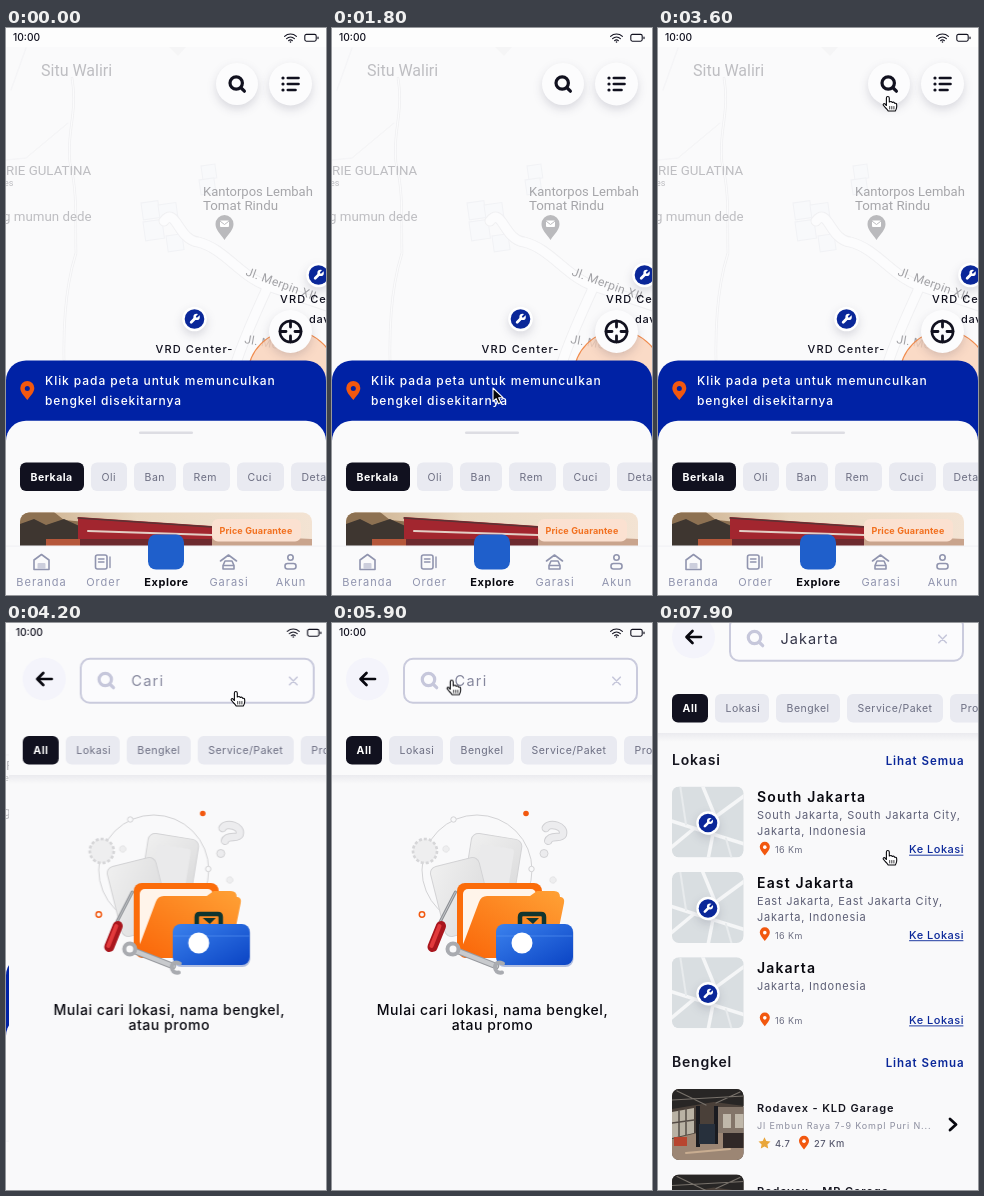
Write an HTML page that moves like this. It is 320 by 567 pixels and loops after 8 s.

```html
<!DOCTYPE html>
<html lang="id">
<head>
<meta charset="utf-8">
<title>Cari bengkel</title>
<style>
html, body { margin: 0; width: 100%; height: 100%; overflow: hidden; background: #f9f9fa; }
svg { display: block; width: 100vw; height: 100vh; }
text { font-family: Inter, sans-serif; white-space: pre; }
.map text { font-family: Roboto, sans-serif; }
.lift { filter: drop-shadow(0 4px 5px rgba(30, 30, 60, .15)); }
.slide { animation: slide 8s infinite; }
.results { animation: results 8s step-end infinite; }
.cursor { animation: move 8s ease-in-out infinite; }
.arrow { animation: arrow 8s step-end infinite; }
.hand { animation: hand 8s step-end infinite; }
@keyframes slide {
  0%, 47.86% { transform: translateX(321px); animation-timing-function: ease-out; }
  52.86%, 100% { transform: translateX(0); }
}
@keyframes results {
  0% { visibility: hidden; }
  80% { visibility: visible; }
}
@keyframes move {
  0%, 12.5% { transform: translate(150px, 590px); }
  21.25%, 23.75% { transform: translate(161px, 360px); }
  36.25%, 55% { transform: translate(230px, 68px); }
  60.6%, 66% { transform: translate(283px, 201px); }
  74.4%, 85% { transform: translate(118px, 55px); }
  93.75%, 100% { transform: translate(230px, 227px); }
}
@keyframes arrow {
  0%, 55.6%, 80% { opacity: 1; }
  35%, 73.5%, 93% { opacity: 0; }
}
@keyframes hand {
  0%, 55.6%, 80% { opacity: 0; }
  35%, 73.5%, 93% { opacity: 1; }
}
</style>
</head>
<body>
<svg id="stage" viewBox="0 0 320 567" preserveAspectRatio="none">
  <defs>
    <linearGradient id="orange" x1="0" y1="1" x2="1" y2="0">
      <stop stop-color="#fa6508"/><stop offset="1" stop-color="#ffa236"/>
    </linearGradient>
    <linearGradient id="blue" x2="1" y2="1">
      <stop stop-color="#3b82ee"/><stop offset="1" stop-color="#0b44c4"/>
    </linearGradient>
    <linearGradient id="paper" x2="1" y2="1">
      <stop stop-color="#f0f0f0"/><stop offset="1" stop-color="#d9d9da"/>
    </linearGradient>
    <linearGradient id="sky">
      <stop stop-color="#c9ab88"/><stop offset=".4" stop-color="#e9d9c2"/><stop offset="1" stop-color="#f3e3d3"/>
    </linearGradient>
    <linearGradient id="shade" x2="0" y2="1">
      <stop stop-color="#30305a" stop-opacity=".07"/><stop offset="1" stop-color="#30305a" stop-opacity="0"/>
    </linearGradient>
    <clipPath id="banner"><rect x="14" y="484.5" width="292" height="60" rx="9"/></clipPath>
    <clipPath id="thumb"><rect width="71.5" height="71" rx="7"/></clipPath>
  </defs>
</svg>
<script>
const INK = '#11111f', GREY = '#6c6e82', NAVY = '#0a2799', PANEL = '#0022a5', CORAL = '#f2580f', FAINT = '#c6c7db';

const rect = (x, y, w, h, r, fill, extra = '') =>
  `<rect x="${x}" y="${y}" width="${w}" height="${h}" rx="${r}" fill="${fill}" ${extra}/>`;
const circle = (x, y, r, fill, extra = '') =>
  `<circle cx="${x}" cy="${y}" r="${r}" fill="${fill}" ${extra}/>`;
const fill = (d, color, extra = '') => `<path d="${d}" fill="${color}" ${extra}/>`;
const line = (d, color, width = 1, extra = '') =>
  `<path d="${d}" fill="none" stroke="${color}" stroke-width="${width}" stroke-linecap="round" stroke-linejoin="round" ${extra}/>`;
const text = (x, y, s, size, color, weight = 400, gap = 0, extra = '') =>
  `<text x="${x}" y="${y}" font-size="${size}" fill="${color}" font-weight="${weight}" letter-spacing="${gap}" ${extra}>${s}</text>`;
const at = (x, y, inner, extra = '') => `<g transform="translate(${x} ${y}) ${extra}">${inner}</g>`;
const centered = 'text-anchor="middle"', ended = 'text-anchor="end"';

const status = () =>
  text(7, 13.3, '10:00', 10.2, INK, 500) +
  line('M278.6 8.3a8.8 8.8 0 0 1 11.8 0M280.6 10.6a5.8 5.8 0 0 1 7.8 0M282.6 12.7a2.8 2.8 0 0 1 3.8 0', INK, 1.1) +
  circle(284.5, 14, .8, INK) +
  rect(298.8, 6.4, 11.4, 6.8, 1.6, 'none', `stroke="${INK}" stroke-width="1.1"`) +
  rect(311.4, 8.4, 1.2, 2.8, .6, INK);

// Each chip: [left, right, label]; the first one is selected
const chips = (y, list) => list.map(([a, b, label], i) =>
  rect(a, y, b - a, 28.5, 6, i ? '#e9eaf1' : INK) +
  text(a + 10.6, y + 18, label, 10.5, i ? GREY : '#fff', i ? 400 : 700, .45)).join('');

const wrench = line('M-3.3 3.3L1.4-1.4', '#fff', 2.8) + circle(2.1, -2.1, 3.2, '#fff') +
  line('M2.4-2.4L5.2-5.2', NAVY, 2);
const spot = (x, y, k = 1) => at(x, y,
  circle(0, 0, 12.3, '#fff', 'class="lift"') + circle(0, 0, 9.8, NAVY) + wrench, `scale(${k})`);
const drop = (x, y, k = 1, hole = '#fff') => at(x, y,
  fill('M0 9C-4 4-7 1-7-3a7 7 0 0 1 14 0C7 1 4 4 0 9z', CORAL) + circle(0, -2.6, 2.5, hole), `scale(${k})`);
const lens = (x, y, color) =>
  at(x, y, circle(0, 0, 6.2, 'none', `stroke="${color}" stroke-width="3.2"`) + line('M5 5L8.2 8.2', color, 3.2));

function mapLayer() {
  const plots = [[135, 175, 17], [152, 177, 18], [137, 194, 19], [160, 208, 16], [195, 138, 14], [193, 152, 15]];
  const river = 'M66 50C72 85 60 105 64 135C72 165 69 195 70 225C62 250 57 280 58 332';
  const road = 'M158 193C170 178 172 212 192 214C218 220 236 250 262 258L330 281M262 258C250 285 240 305 230 335';
  const place = '#a6a6aa', faded = '#bebec2', street = '#a2a2a6';
  return '<g class="map">' + rect(0, 0, 320, 400, 0, '#fafafb') + rect(0, 0, 320, 19, 0, '#fdfdfd') +
    fill('M163 19h17l-8 9z', '#f5f5f6') +
    plots.map(([x, y, s]) => rect(x, y, s, s, 0, '#f8f9fb', `stroke="#f1f2f5" transform="rotate(-8 ${x} ${y})"`)).join('') +
    line(river, '#eeeef0', 2.6) + line(river, '#fbfbfc', 1.2) +
    line('M20 20L5 62M62 95L20 130L0 132', '#f5f5f7', 1.5) +
    line(road, '#f0f0f2', 11) + line(road, '#fcfcfd', 9) +
    text(35, 47.5, 'Situ Waliri', 16, faded) + text(0, 147, 'RIE GULATINA', 13.3, faded) + text(-2, 158, 'es', 9, faded) +
    text(-3, 193, 'g mumun dede', 13.3, faded) +
    text(197, 168, 'Kantorpos Lembah', 13, place) + text(197, 181.5, 'Tomat Rindu', 13.3, place) +
    fill('M218.5 212C214 205 209.5 202 209.5 196a9 9 0 0 1 18 0C227.5 202 223 205 218.5 212z', '#bababd') +
    rect(214, 192.5, 9, 6.5, 1, '#fff') + line('M214.5 193.5l4 3 4-3', '#bababd') +
    text(239, 247, 'Jl. Merpin XII', 12, street, 400, .3, 'transform="rotate(20 239 247)"') +
    text(238, 315, 'Jl. Merpin', 12, street, 400, .3, 'transform="rotate(10 238 315)"') + '</g>' +
    circle(286, 347, 44, '#fad3b9', 'fill-opacity=".8" stroke="#f08c4e" stroke-width="1.2"');
}

function tabBar() {
  const c = '#9094ae';
  const labels = [[35.5, 'Beranda'], [97.5, 'Order'], [160.5, 'Explore'], [223, 'Garasi'], [285, 'Akun']];
  return rect(0, 518, 320, 49, 0, '#fafafb') + line('M0 518H320', '#f0f0f4') +
    line('M28 532l7.5-5.5 7.5 5.5v9.5h-15z', c, 1.6) + rect(31.5, 535, 8, 6, 1, '#cccedc') +
    rect(89.5, 527, 11.5, 14, 2, 'none', `stroke="${c}" stroke-width="1.6"`) +
    line('M92.5 531h5.5M92.5 534h5.5M104 529v10.5', c, 1.4) +
    line('M214.5 533l8-6 8 6M217 541v-3.5l2-4.5h7l2 4.5v3.5zM217 537.5h11', c, 1.6) +
    circle(284.5, 529.5, 2.7, 'none', `stroke="${c}" stroke-width="1.6"`) +
    rect(279, 535.5, 11, 5.5, 2.5, 'none', `stroke="${c}" stroke-width="1.6"`) +
    rect(142, 506.5, 36, 35, 8, '#1f5fcb') +
    labels.map(([x, s], i) => i === 2
      ? text(x, 558, s, 11, '#08080f', 700, .55, centered)
      : text(x, 558, s, 11, c, 400, 1, centered)).join('');
}

function home() {
  const photo = '<g clip-path="url(#banner)">' + rect(14, 484, 292, 60, 0, 'url(#sky)') +
    fill('M14 484h34l10 8 22 2v26H14z', '#8d7152') + fill('M14 496l14-5 12 6 18-6 22 10v20H14z', '#3e3630') +
    fill('M72 489l134 9v22H72z', '#a2262f') + line('M72 490L206 499', '#5b3234', 1.6) +
    line('M82 503L206 507', '#e3cfc6', 2) + fill('M72 511h134v9H72z', '#6d2a2e') +
    fill('M206 506l100 5v9H206z', '#c9a48d') + fill('M40 511h34v9H40z', '#b5573a') + '</g>';
  const ring = circle(284.5, 303.5, 10.6, 'none', `stroke="${INK}" stroke-width="2.5"`);
  const icons =
    circle(231, 56, 21, '#fcfcfd', 'class="lift"') + lens(230.2, 55, INK) +
    circle(284.5, 56, 21.5, '#fcfcfd', 'class="lift"') +
    [50, 56, 62].map(y => circle(277, y, 1.6, INK) + line(`M281.8 ${y}H${y === 62 ? 289.5 : 292.5}`, INK, 2.6)).join('') +
    circle(284.5, 303.5, 21.5, '#fcfcfd', 'class="lift"') + ring +
    line('M284.5 293v6M284.5 308v6M274 303.5h6M289 303.5h6', INK, 2.8);
  return mapLayer() + spot(188.5, 291) + spot(312.5, 247) +
    text(149.5, 325, 'VRD Center-', 11, INK, 500, 1.1) + text(274, 275, 'VRD Ce', 11, INK, 500, 1.1) +
    text(303, 295, 'dav', 11, INK, 500, .7) + icons + status() +
    rect(0, 332.5, 320, 100, 20, PANEL) + drop(21.3, 363, 1, PANEL) +
    text(39, 357, 'Klik pada peta untuk memunculkan', 12, '#fff', 500, .93) +
    text(39, 377, 'bengkel disekitarnya', 12, '#fff', 500, .9) +
    rect(0, 392.8, 320, 220, 20, '#fafafb') + rect(133, 403.5, 54, 2.4, 1.2, '#dddde3') +
    chips(434.5, [[14, 78, 'Berkala'], [85, 121, 'Oli'], [128, 170, 'Ban'], [177, 224, 'Rem'], [231, 278, 'Cuci'], [285, 340, 'Detailing']]) +
    photo + rect(206, 491, 89, 22.5, 6, '#fbe1d1') +
    text(213.5, 505.8, 'Price Guarantee', 9, '#f2701f', 700, .15) + tabBar();
}

const header = query => rect(0, 0, 320, 152, 0, '#fafafb') + rect(0, 152, 320, 9, 0, 'url(#shade)') + status() +
  circle(35.5, 56, 21.5, '#f4f4fb') + line('M43 56H29M34.5 50l-6 6 6 6', '#08080f', 2.7) +
  rect(72, 35.8, 233, 44, 9, '#fbfbfd', 'stroke="#cacbdd" stroke-width="2"') + lens(96.5, 56.5, FAINT) +
  text(122.5, 63, query || 'Cari', 14.5, query ? '#333448' : '#85879d', 400, query ? 1 : 1.3) +
  line('M280.8 54.2l7.5 7.5M288.3 54.2l-7.5 7.5', FAINT, 1.6) +
  chips(113, [[14, 50, 'All'], [57, 111, 'Lokasi'], [118, 182, 'Bengkel'], [189, 285, 'Service/Paket'], [292, 345, 'Promo']]);

function toolbox() {
  const pale = 'stroke="#d3d3d5" stroke-width="1"';
  const hook = 'M-10-3C-8-10 9-9 8 0C7 5-4 2-5 9';
  const gear = (x, y, r) => circle(x, y, r, '#eeeeef', `stroke="#d6d6d8" stroke-width="${r / 4.5}" stroke-dasharray="${r / 4} ${r / 6}"`);
  return circle(145, 247, 55, 'none', pale) + circle(121.5, 196.5, 2.7, '#f9f9fa', pale) +
    circle(199.5, 246, 2.7, '#f9f9fa', pale) + gear(93, 228, 12) + gear(114, 226, 3.2) + gear(221, 257, 3.2) +
    circle(194, 190.5, 2.8, CORAL) + circle(90, 291.5, 2.7, 'none', `stroke="${CORAL}" stroke-width="1.5"`) +
    at(223, 210, line(hook, '#d0d0d3', 8.5) + line(hook, '#ececee', 6.5), 'rotate(12)') +
    circle(212, 230.5, 4, '#ececee', pale) +
    rect(135, 213, 51, 66, 7, 'url(#paper)', `${pale} transform="rotate(9 160 246)"`) +
    rect(145, 223, 34, 40, 3, '#eaeaeb', 'transform="rotate(9 160 246)"') +
    rect(105, 238, 50, 72, 7, 'url(#paper)', `${pale} transform="rotate(-14 130 274)"`) +
    rect(125, 260, 85, 74, 8, '#fb6c0a') + rect(131, 266, 73, 58, 5, '#fff4ea') +
    fill('M133 335q-6-1-4-8l18-48q2-6 8-6h43l7-5h17q6 0 6 6h1q4 1 3 6l-10 49q-2 6-8 6z', 'url(#orange)') +
    line('M188 302v-8q0-3 3-3h18q3 0 3 3v8', '#10352f', 4.5) + fill('M194 295h13l-6 6z', '#10352f') +
    rect(164.5, 302, 77, 42, 8, '#0a37a4', 'opacity=".3"') +
    rect(164, 301, 77, 41, 8, 'url(#blue)') + line('M165 313H240', '#5b99f5', .8, 'opacity=".7"') +
    circle(190, 320, 10.5, '#fff') +
    line('M108 299L123.5 269', '#8d9095', 3) + line('M108 299L123.5 269', '#c3c5c8') +
    line('M100.5 324L109 303', '#a9161d', 10) + line('M99.5 323L107.5 303', '#e23a3c', 4) +
    line('M122 326.5L164 343', '#97999e', 6.5) + line('M122 326.5L164 343', '#c8cacd', 4.5) +
    circle(121, 326, 5.5, '#f9f9fa', 'stroke="#a9abb0" stroke-width="4"') +
    line('M171 340.5q-7-3-8 3q0 7 7 6', '#a9abb0', 4);
}

const search = () => rect(0, 0, 321, 567, 0, '#f9f9fa') + header() + toolbox() +
  text(160.5, 391.5, 'Mulai cari lokasi, nama bengkel,', 14, '#08080f', 500, .56, centered) +
  text(160.5, 406.5, 'atau promo', 14, '#08080f', 500, .56, centered);

function place(y, title, ...rows) {
  const roads = line('M-2 34L26 43L74 58M30 -2L44 32L36 73M44 30L74 8M-2 62L22 42', '#f5f6f7', 3.5) +
    line('M8 -2L14 38M54 52L60 73', '#e8ebed', 2);
  return at(14, y, '<g clip-path="url(#thumb)">' + rect(0, 0, 72, 71, 0, '#d9dee1') + roads + '</g>' + spot(36, 36.5, .95)) +
    text(99, y + 15.5, title, 14, '#08080f', 600, 1.15) +
    rows.map((s, i) => text(99, y + 32.8 + i * 16, s, 11, '#5d5f76', 400, .78)).join('') +
    drop(106.8, y + 62.5, .72) + text(117, y + 66.5, '16 Km', 9, GREY, 400, .4) +
    text(306, y + 66.5, 'Ke Lokasi', 11, NAVY, 500, .5, ended) + line(`M251.5 ${y + 68.7}H305`, NAVY, .9);
}

const garagePhoto = y => at(14, y, '<g clip-path="url(#thumb)">' + rect(0, 0, 72, 71, 0, '#4a4039') +
  fill('M0 0h72v17L42 13L0 20z', '#282625') + line('M5 2L34 16M68 3L44 14M0 11L72 7', '#77716a', 1.2) +
  fill('M0 23l22-4v25L0 49z', '#b9b2a4') + line('M7 22v25M14 20v26M0 34l22-3', '#554c46', 1.5) +
  fill('M46 18h26v27H46z', '#837569') + fill('M51 25h8v14h-8zM63 25h9v14h-9z', '#c0b8aa') +
  fill('M0 50l25-6h47v27H0z', '#9c8674') + fill('M24 17h4v41h-4zM42 17h4v38h-4z', '#1a1b20') +
  fill('M27 35h16v20H27z', '#27303c') + fill('M2 48h13v9H2z', '#b8452f') +
  fill('M51 44h21v15H51z', '#302827') + line('M14 64L58 60', '#c9ad91', 2) + '</g>');

const heading = (y, s) => text(14, y, s, 14, '#15151f', 600, .8) +
  text(306.5, y, 'Lihat Semua', 11.5, NAVY, 600, .95, ended);

function results() {
  const star = Array.from({ length: 10 }, (_, i) => {
    const r = i % 2 ? 3 : 6.3, a = i * Math.PI / 5;
    return `${(106.5 + r * Math.sin(a)).toFixed(1)} ${(520.5 - r * Math.cos(a)).toFixed(1)}`;
  });
  return rect(0, 0, 320, 567, 0, '#f9f9fa') + at(0, -42, header('Jakarta')) +
    heading(142, 'Lokasi') +
    place(163.5, 'South Jakarta', 'South Jakarta, South Jakarta City,', 'Jakarta, Indonesia') +
    place(249, 'East Jakarta', 'East Jakarta, East Jakarta City,', 'Jakarta, Indonesia') +
    place(334.2, 'Jakarta', 'Jakarta, Indonesia') +
    heading(444, 'Bengkel') + garagePhoto(466) +
    text(99, 488.5, 'Rodavex - KLD Garage', 11, '#15151f', 600, .9) +
    text(99, 506, 'Jl Embun Raya 7-9 Kompl Puri N...', 9, '#8c8e9f', 400, .88) +
    fill(`M${star.join('L')}z`, '#e9a63a') + text(117, 524, '4.7', 9.3, '#55576c', 500, .5) +
    drop(146, 520, .72) + text(156, 524, '27 Km', 9.3, '#55576c', 500, .5) +
    line('M292 496l6 5.5-6 5.5', '#08080f', 2.8) +
    garagePhoto(551.5) + text(99, 571.5, 'Rodavex - MP Garage', 11, '#15151f', 600, .9);
}

const outlined = (d, inside, edge) => fill(d, inside, `stroke="${edge}" stroke-width="1.1" stroke-linejoin="round"`);
const cursor =
  `<g class="arrow">${outlined('M0 0V13.5l3.2-2.9 2.2 5.1 2.5-1.1-2.2-4.9H10z', '#08080c', '#fff')}</g>` +
  '<g class="hand">' +
  outlined('M-1.6 9.5V2Q-1.6.5-.2.5T1.3 2V6Q3.6 4.8 4.2 6.5Q6.3 5.5 6.6 7.3Q8.7 6.8 8.7 9V11Q8.5 13 7.3 15H.2Q-1 13-2.8 11.5L-4.8 9Q-5 7.3-3.3 7.7z', '#fff', '#08080c') +
  line('M1.7 10.5v2.5M3.8 10.5v2.5M5.9 10.5v2.5', '#08080c', .8) + '</g>';

document.getElementById('stage').insertAdjacentHTML('beforeend',
  `<g>${home()}</g><g class="slide">${search()}</g><g class="results">${results()}</g><g class="cursor">${cursor}</g>`);
</script>
</body>
</html>
```
